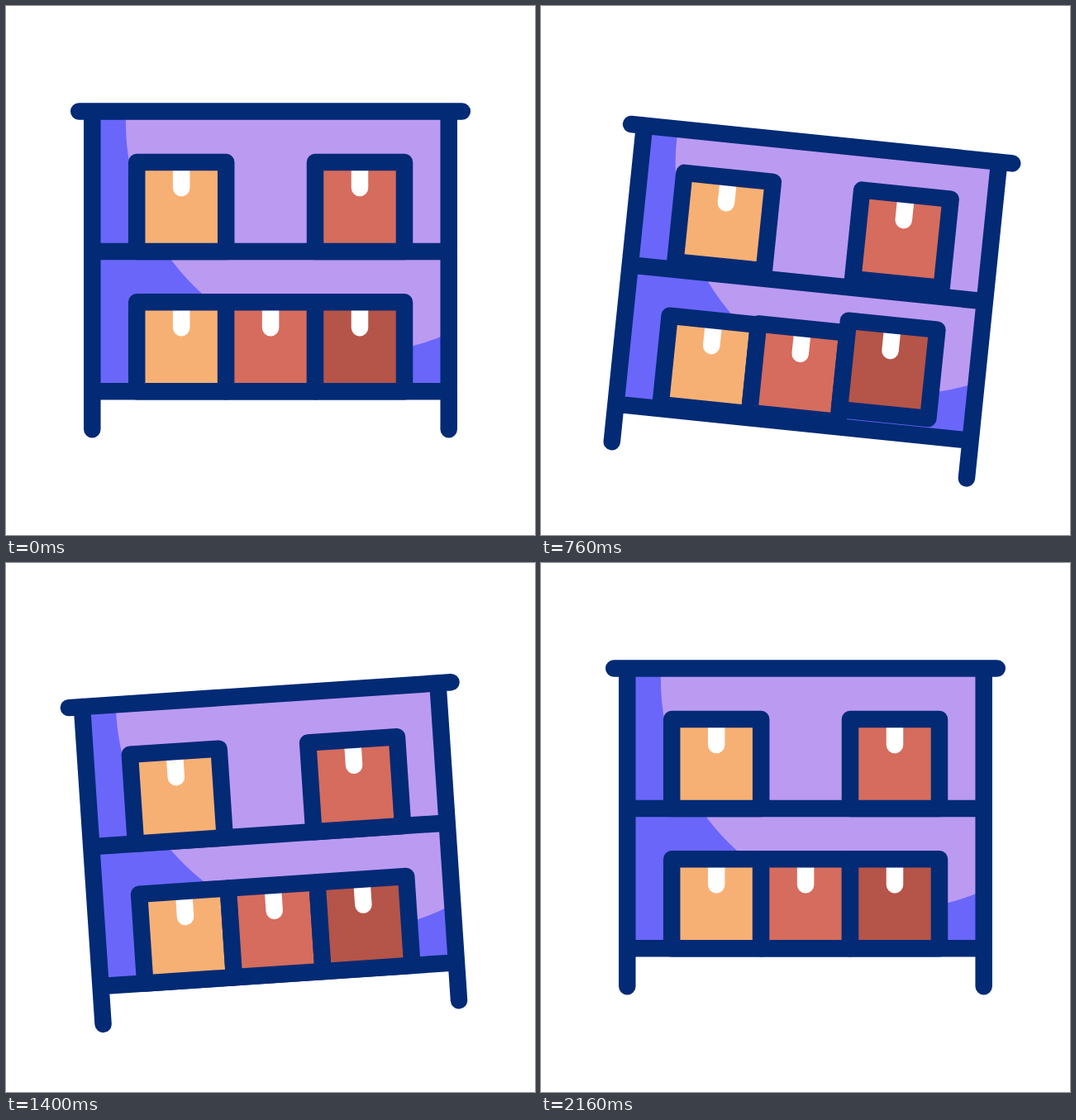
Write an HTML page that moves like this. It is 640x640 px and loops after 2240 ms.

```html
<!DOCTYPE html>
<html lang="en">
<head>
<meta charset="utf-8">
<title>Dancing shelf</title>
<style>
  html, body { margin: 0; width: 100%; height: 100%; overflow: hidden; background: #fff; }
  svg { display: block; width: 100vw; height: 100vh; }
  .line { fill: none; stroke: #022a75; stroke-width: 20.5; stroke-linecap: round; stroke-linejoin: round; }
  .label { stroke: #fff; stroke-width: 20.5; stroke-linecap: round; }
</style>
</head>
<body>
<svg viewBox="0 0 640 640">
  <clipPath id="back"><path d="M104.3 127.5H535.7V466.3H104.3Z"/></clipPath>
  <g id="shelf">
    <g clip-path="url(#back)">
      <path d="M104 127H536V467H104Z" fill="#6a66fa"/>
      <circle cx="423.6" cy="141" r="278.7" fill="#bb9af2"/>
    </g>
    <path class="line" d="M104.3 127.5V512.2M535.7 127.5V512.2M88.2 127.5H551.8M104.3 297H535.7M104.3 466.3H535.7"/>
    <g id="boxes"></g>
  </g>
</svg>
<script>
const LOOP = 2240, STEP = 40;
const shelf = document.getElementById('shelf');
const boxLayer = document.getElementById('boxes');

// Symmetric cubic ease: control points (k, 0) and (1 - k, 1).
const ease = k => u => {
  let lo = 0, hi = 1;
  for (let i = 0; i < 24; i++) {
    const p = (lo + hi) / 2, q = 1 - p;
    const x = 3 * k * p * q * q + 3 * (1 - k) * p * p * q + p * p * p;
    if (x < u) lo = p; else hi = p;
  }
  return lo * lo * (3 - 2 * lo);
};
const soft = ease(1 / 3), medium = ease(0.5), firm = ease(0.6), strong = ease(2 / 3);

// Keys are [time, value, ease into this key].
function track(keys, t) {
  if (t <= keys[0][0]) return keys[0][1];
  for (let i = 1; i < keys.length; i++) {
    const [t0, v0] = keys[i - 1], [t1, v1, fn] = keys[i];
    if (t < t1) return v0 + (v1 - v0) * fn((t - t0) / (t1 - t0));
  }
  return keys[keys.length - 1][1];
}

const tilt = [[40, 0], [680, 5.95, strong], [1480, -3.9, strong], [2160, 0, strong]];
const drop = [[0, 0], [1000, 41.2, firm], [2140, 0, medium]];
const hop = [[0, 0], [300, -32, soft], [620, 0, soft], [750, -11, soft], [980, 0, soft]];

const ORANGE = '#f7b074', RED = '#d56c5d', BROWN = '#b55448';
const boxes = [
  { x: 212.2, y: 189, color: ORANGE, lag: 40 },
  { x: 428, y: 189, color: RED, lag: 20 },
  { x: 212.2, y: 358.2, color: ORANGE, lag: 80 },
  { x: 320.1, y: 358.2, color: RED, lag: 230 },
  { x: 428, y: 358.2, color: BROWN, lag: 335 }
];

boxLayer.innerHTML = boxes.map(({ color }) => `<g>
  <path d="M-54 0H54V108H-54Z" fill="${color}"/>
  <path class="label" d="M0 4V31"/>
  <path class="line" d="M-54 0H54V108H-54Z"/></g>`).join('');

function draw(t) {
  shelf.setAttribute('transform',
    `translate(0 ${track(drop, t)}) rotate(${track(tilt, t)} 320 320)`);
  boxes.forEach(({ x, y, lag }, i) => {
    boxLayer.children[i].setAttribute('transform', `translate(${x} ${y + track(hop, t - lag)})`);
  });
}

let start;
function tick(now) {
  start ??= now;
  const t = (now - start) % LOOP;
  draw(Math.min(Math.floor(t / STEP) * STEP, 2160));
  requestAnimationFrame(tick);
}
draw(0);
requestAnimationFrame(tick);
</script>
</body>
</html>
```
